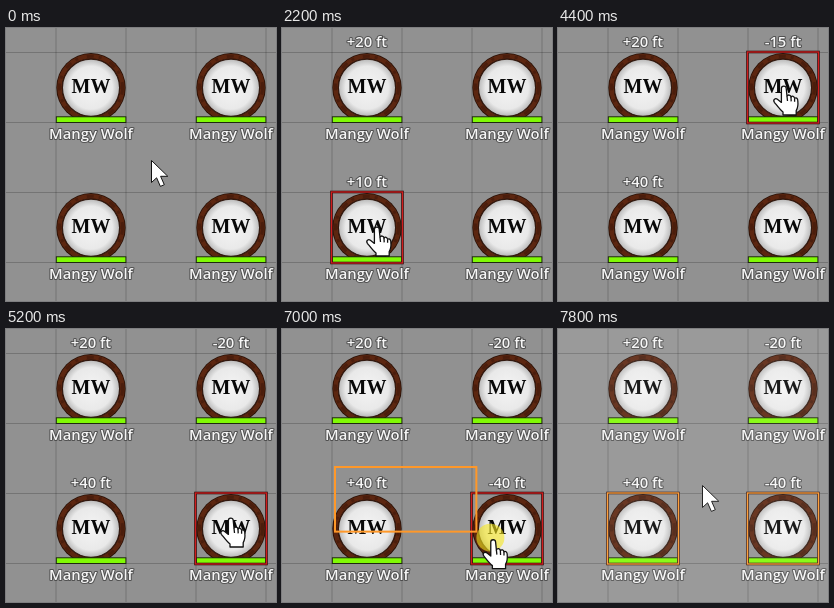
An HTML page that plays this animation: 270 by 273 pixels, repeating every 8000 ms.

```html
<!DOCTYPE html>
<html lang="en">
<head>
<meta charset="utf-8">
<title>Token movement</title>
<style>
  html, body { margin: 0; width: 100%; height: 100%; overflow: hidden; background: #919191; }
  svg { display: block; width: 100vw; height: 100vh; }
  .label {
    font: 600 14.8px "Open Sans", "Noto Sans", sans-serif;
    text-anchor: middle; fill: #f6f6f6;
    stroke: #303030; stroke-width: 2px; stroke-opacity: .65;
    stroke-linejoin: round; paint-order: stroke;
  }
  .initials {
    font: bold 20px "Liberation Serif", "Noto Serif", serif;
    text-anchor: middle; fill: #080808;
  }
</style>
</head>
<body>
<svg id="stage" viewBox="0 0 270 273" preserveAspectRatio="none">
  <defs>
    <radialGradient id="face">
      <stop offset="0" stop-color="#f4f4f4"/>
      <stop offset=".75" stop-color="#e9e9e9"/>
      <stop offset="1" stop-color="#b8b8b8"/>
    </radialGradient>
  </defs>
  <rect width="270" height="273" fill="#919191"/>
  <path id="grid" fill="none" stroke="#000" stroke-opacity=".2"/>
  <g id="tokens"></g>
  <rect id="drag" x="53" y="138" fill="none" stroke="#ff9829" stroke-width="2"/>
  <circle id="press" fill="#f5e61e" fill-opacity=".6"/>
  <g id="cursor" fill="#fff" stroke="#111" stroke-linejoin="round">
    <path id="arrow" d="M.5 .5V22.5L5.6 17.8 9.4 26.4 13.3 24.7 9.6 16.3H16.8Z"/>
    <g id="hand" stroke-width="1.3">
      <path d="M-2.6 2.4C-2.6 -.6 1.9 -.6 2.2 2.2L3 10.2C4 8.3 6.6 8.7 7 11C8.2 9.5 10.3 10.2 10.6 12.2C12 11.2 13.7 12.2 13.8 14.4C14.2 18.5 14.3 21.5 12.2 24.6V29H-1V26C-4.2 23.6 -6.8 19.8 -9.6 16.3C-11.4 13.6 -8.6 11.6 -6.3 13.4L-2.6 16.4Z"/>
      <path d="M3 10.2L3.5 15M7 11L7.2 15.4M10.6 12.2V15.8" fill="none"/>
    </g>
  </g>
  <rect id="fade" width="270" height="273" fill="#fff"/>
</svg>
<script>
const LOOP = 8000, STEP = 200, CELL = 70;
const DRAG_START = 6800, DRAG_END = 7400;
const $ = id => document.getElementById(id);

function set(el, attrs) {
  for (const key in attrs) el.setAttribute(key, attrs[key]);
}
function add(parent, tag, attrs, text = "") {
  const el = document.createElementNS("http://www.w3.org/2000/svg", tag);
  set(el, attrs);
  el.textContent = text;
  return parent.appendChild(el);
}
const show = (el, on) => set(el, { visibility: on ? "visible" : "hidden" });
const progress = (t, from, to) => Math.min(1, Math.max(0, (t - from) / (to - from)));
const easeOut = u => 1 - (1 - u) ** 3;

// The pointer glides to each stop between its leave and arrive times
const stops = [
  { leave: 0, arrive: 800, x: 90, y: 58 },
  { leave: 1400, arrive: 1800, x: 95, y: 199 },
  { leave: 3000, arrive: 3400, x: 187, y: 125 },
  { leave: 3400, arrive: 3800, x: 226, y: 58 },
  { leave: 4600, arrive: 5000, x: 225, y: 189 },
  { leave: 6200, arrive: 6800, x: 53, y: 138 },
  { leave: 6800, arrive: 7200, x: 234, y: 221 },
  { leave: 7200, arrive: 7800, x: 144, y: 156 }
];

// Each counter runs from zero to feet between its two times
const tokens = [
  { x: 50, y: 25, from: 600, to: 1400, feet: 20 },
  { x: 190, y: 25, from: 3800, to: 4600, feet: -20 },
  { x: 50, y: 165, from: 2000, to: 3000, feet: 40 },
  { x: 190, y: 165, from: 5200, to: 6200, feet: -40 }
];

function pointerAt(t) {
  let x = 145, y = 132;
  for (const stop of stops) {
    const u = easeOut(progress(t, stop.leave, stop.arrive));
    x += (stop.x - x) * u;
    y += (stop.y - y) * u;
  }
  return [x, y];
}

function labelAt(token, t) {
  const feet = 5 * Math.round(token.feet * progress(t, token.from, token.to) / 5);
  return feet ? `${feet > 0 ? "+" : ""}${feet} ft` : "";
}

function buildToken(token) {
  const g = add($("tokens"), "g", { transform: `translate(${token.x} ${token.y})` });
  const disc = attrs => add(g, "circle", { cx: 35, cy: 34.7, fill: "none", ...attrs });
  disc({ r: 34.7, fill: "#281006" });
  disc({ r: 31.5, stroke: "#5c2610", "stroke-width": 4.6 });
  disc({ r: 31.5, stroke: "#3f180b", "stroke-width": 3, "stroke-dasharray": "7 5 3 9", "stroke-opacity": .6 });
  disc({ r: 28.6, fill: "url(#face)", stroke: "#32180e", "stroke-width": 1.2 });
  add(g, "text", { x: 35, y: 40.3, class: "initials" }, "MW");
  add(g, "rect", { x: .3, y: 63.8, width: 69.6, height: 5.7, fill: "#80fa04", stroke: "#151b08", "stroke-width": .9 });

  const box = { x: -.5, y: -1, width: 71, height: 71 };
  token.frame = add(g, "g", { fill: "none" });
  add(token.frame, "rect", { ...box, stroke: "#2b1010", "stroke-width": 2.6 });
  token.edge = add(token.frame, "rect", { ...box, "stroke-width": 1.3 });
  add(g, "text", { x: 35, y: 86.4, class: "label" }, "Mangy Wolf");
  token.label = add(g, "text", { x: 35, y: -6.2, class: "label" });
}

function draw(time) {
  const t = Math.floor((time % LOOP) / STEP) * STEP;
  const [x, y] = pointerAt(t);
  const selected = t >= DRAG_END;
  const dragging = t >= DRAG_START && !selected;
  let over = false;

  for (const token of tokens) {
    const hover = x >= token.x && x <= token.x + CELL && y >= token.y && y <= token.y + CELL;
    const picked = selected && token.y > CELL;
    over = over || hover;
    show(token.frame, hover || picked);
    set(token.edge, { stroke: picked ? "#ff9829" : "#d01c1c" });
    token.label.textContent = labelAt(token, t);
  }

  // The selection box trails the pointer slightly
  show($("drag"), dragging && t > DRAG_START);
  set($("drag"), { width: Math.max(0, x - 70), height: Math.max(0, y - 146) });
  show($("press"), dragging);
  set($("press"), { cx: x - 3, cy: y - 2, r: 9 + 5 * progress(t, DRAG_START, DRAG_START + STEP) });

  set($("cursor"), { transform: `translate(${x} ${y})` });
  show($("arrow"), !over);
  show($("hand"), over);
  set($("fade"), { opacity: .08 * progress(t, DRAG_END, LOOP - STEP) });
}

let grid = "";
for (let i = 0; i < 4; i++) grid += `M${50 + i * CELL} 0V273M0 ${24.5 + i * CELL}H270`;
set($("grid"), { d: grid });
tokens.forEach(buildToken);

const start = performance.now();
function tick() {
  draw(performance.now() - start);
  requestAnimationFrame(tick);
}
tick();
</script>
</body>
</html>
```
